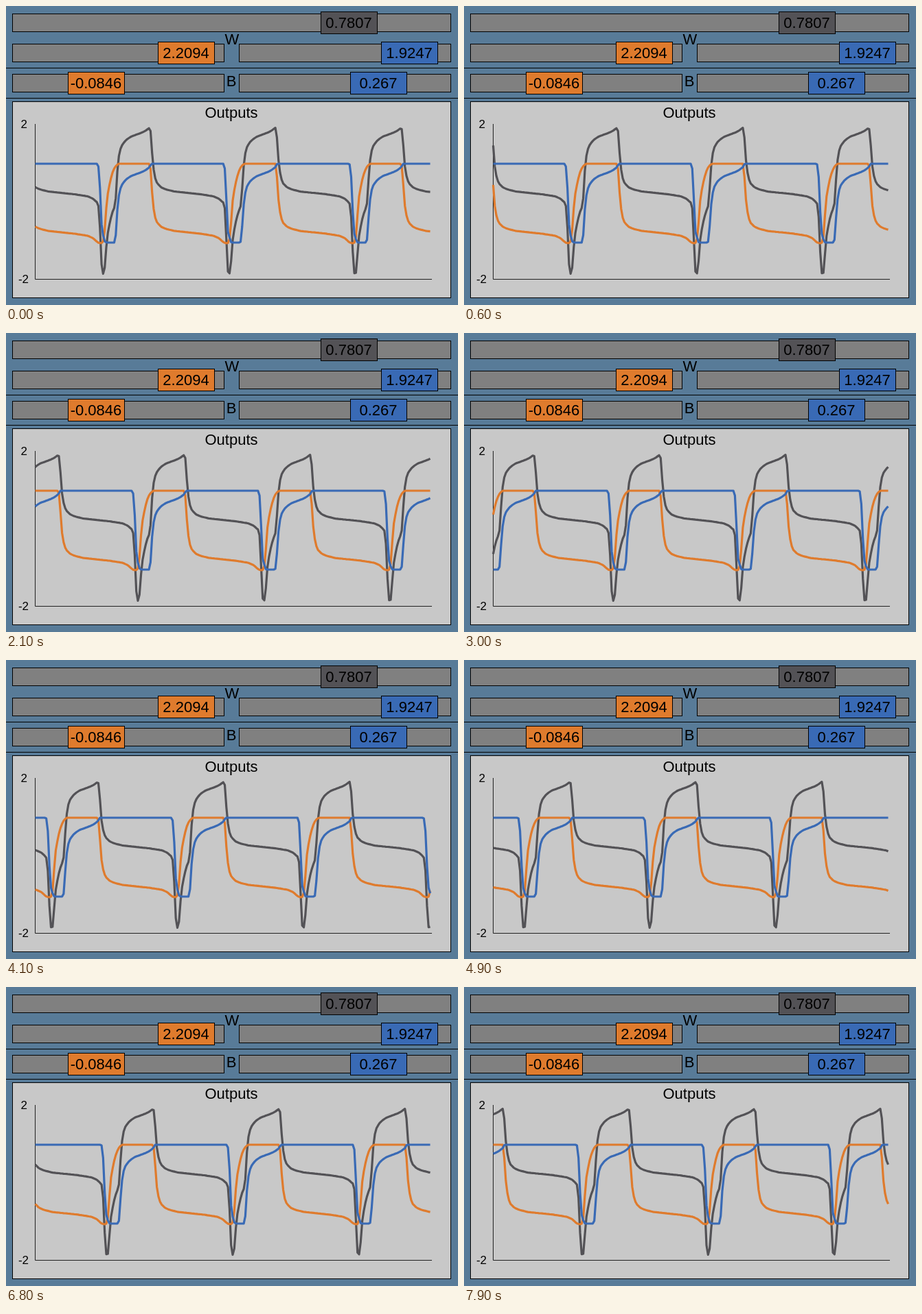
An HTML page that plays this animation: 658x436 px, repeating every 8000 ms.

```html
<!DOCTYPE html>
<html lang="en">
<head>
<meta charset="utf-8">
<title>Outputs</title>
<style>
  html, body { margin: 0; width: 100%; height: 100%; overflow: hidden; background: #587b98; }
  svg { display: block; }
  text { font: 22px "Liberation Sans", Arial, sans-serif; text-anchor: middle; }
  .tick { font-size: 17px; text-anchor: end; }
  rect, line { stroke: #000; }
  polyline { fill: none; stroke-width: 3.2; stroke-linejoin: round; }
</style>
</head>
<body>
<svg width="658" height="436" viewBox="0 0 658 436">
  <g id="sliders"></g>
  <path d="M0 90.5H658M0 134.5H658" stroke="#000"/>
  <text x="329" y="55.5">W</text>
  <text x="328" y="117">B</text>
  <rect x="9.5" y="139.5" width="638" height="286" fill="#c8c8c8"/>
  <text x="328" y="163">Outputs</text>
  <text class="tick" x="31" y="178">2</text>
  <text class="tick" x="33" y="404">-2</text>
  <path d="M42.5 172V398.5H620" fill="none" stroke="#222"/>
  <polyline id="sum" stroke="#535256"/>
  <polyline id="first" stroke="#df7b2d"/>
  <polyline id="second" stroke="#396ab5"/>
</svg>
<script>
const $ = id => document.getElementById(id);
const GREY = '#535256', ORANGE = '#df7b2d', BLUE = '#396ab5';

// track x, track width, y, knob x, label, colour
const sliders = [
  [9.5, 638, 11.5, 458.5, '0.7807', GREY],
  [9.5, 308, 55.5, 221.5, '2.2094', ORANGE],
  [339.5, 308, 55.5, 546.5, '1.9247', BLUE],
  [9.5, 308, 99.5, 90.5, '-0.0846', ORANGE],
  [339.5, 308, 99.5, 501.5, '0.267', BLUE]
];
$('sliders').innerHTML = sliders.map(([x, w, y, knob, label, colour]) => `
  <rect x="${x}" y="${y}" width="${w}" height="26" fill="#808080"/>
  <rect x="${knob}" y="${y - 3}" width="82" height="32" fill="${colour}"/>
  <text x="${knob + 40.5}" y="${y + 20.5}">${label}</text>`).join('');

const STEP = 2.3, SAMPLES = 250, LEFT = 42.5;
const PERIOD = STEP * 239 / 3, START = 131, MID = 287.5;

// One period of each output as [x, y] points.
const firstWave = [
  [131, 342.5], [134, 345], [138, 346], [141, 345], [143, 336], [145, 308],
  [147, 281], [149, 269], [152, 254], [155, 243], [158, 236], [161, 232],
  [164, 230], [209, 230], [210.5, 238], [212, 262], [214, 290], [217, 308],
  [220, 316], [226, 322], [233, 325], [245, 328], [264, 330], [283, 332],
  [302, 335], [310, 338.5], [START + PERIOD, 342.5]
];
const secondWave = [
  [131, 230], [133.5, 230], [135.5, 238], [137.5, 280], [139.5, 328], [141.5, 335],
  [144, 344], [147, 345], [158, 345], [159.5, 339], [162, 298], [164, 278],
  [166, 268], [168, 262], [172, 256], [176, 252], [182, 248], [190, 245],
  [198, 242], [203, 239.5], [209, 235], [211.5, 230], [START + PERIOD, 230]
];
// Time in 100 ms ticks against samples scrolled.
const scroll = [[0, 0], [12, 12], [30, 33], [41, 47], [58, 68], [68, 82], [79, 93]];

function lerp(points, x) {
  let i = 1;
  while (i < points.length - 1 && points[i][0] < x) i++;
  const [x0, y0] = points[i - 1], [x1, y1] = points[i];
  return y0 + (y1 - y0) * (x - x0) / (x1 - x0);
}

function draw(ms) {
  const tick = Math.floor(ms % 8000 / 100);
  const shift = Math.floor(lerp(scroll, tick) + 1e-6);
  const lines = { sum: [], first: [], second: [] };
  for (let i = 0; i <= SAMPLES; i++) {
    const x = LEFT + i * STEP;
    const offset = x - shift * STEP - START;
    const phase = START + ((offset % PERIOD) + PERIOD) % PERIOD;
    const a = lerp(firstWave, phase), b = lerp(secondWave, phase);
    const add = (id, y) => lines[id].push(x.toFixed(1) + ',' + y.toFixed(1));
    add('sum', a + b - MID);
    add('first', a);
    add('second', b);
  }
  for (const id in lines) $(id).setAttribute('points', lines[id].join(' '));
}

const began = performance.now();
function frame() {
  draw(performance.now() - began);
  requestAnimationFrame(frame);
}
frame();
</script>
</body>
</html>
```
